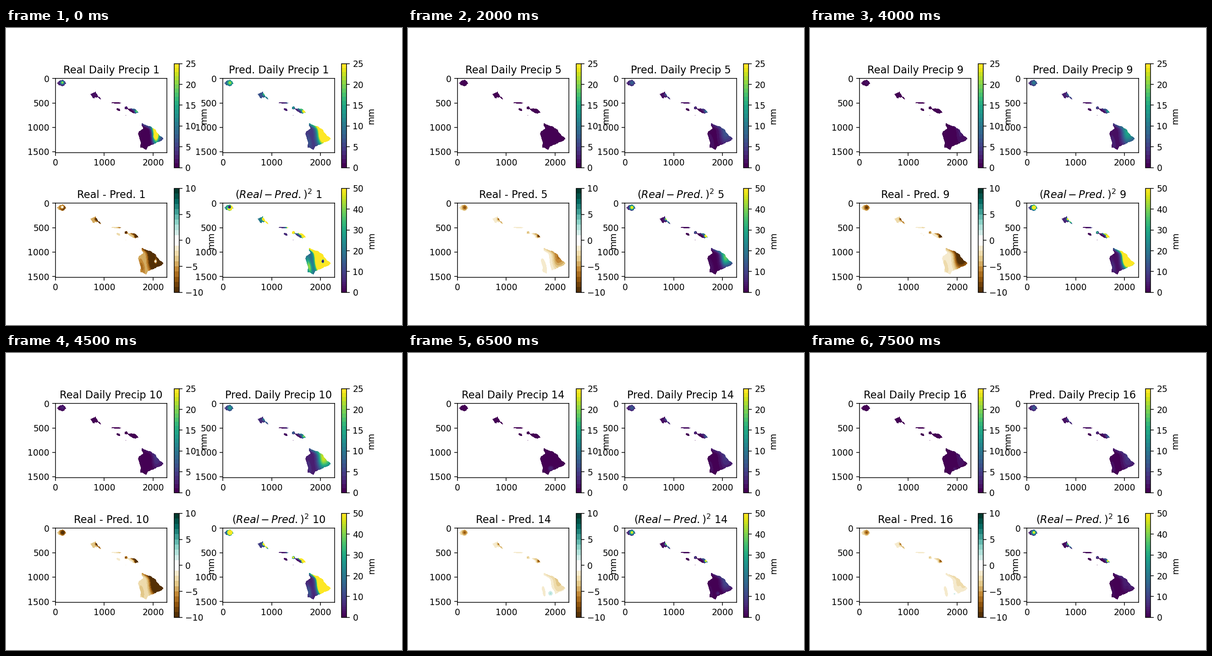
Recreate the animation shown at these times as a matplotlib script. Size 864x648 px, loop 8000 ms.

```python
import matplotlib.pyplot as plt
import numpy as np
from matplotlib.animation import FuncAnimation
from matplotlib.colors import ListedColormap
from matplotlib.path import Path

W, H, CELL = 2288, 1520, 4
PX = 0.10642  # screen pixels per data unit; outlines and fields use pixels
gx, gy = np.meshgrid((np.arange(0, W, CELL) + CELL / 2) * PX,
                     (np.arange(0, H, CELL) + CELL / 2) * PX)
rng = np.random.default_rng(4)


def turned(x, y, deg):
    c, s = np.cos(np.radians(deg)), np.sin(np.radians(deg))
    return (gx - x) * c + (gy - y) * s, (gy - y) * c - (gx - x) * s


def oval(x, y, a, b, deg=0, wobble=0.06):
    """Mask of an ellipse with a slightly lobed edge."""
    u, v = turned(x, y, deg)
    t = np.arctan2(v / b, u / a)
    edge = 1 + wobble * (np.cos(5 * t) + 0.6 * np.sin(8 * t))
    return np.hypot(u / a, v / b) < edge


def coast(*xy):
    """Mask of a polygon whose sides are roughened by midpoint shifts."""
    p = np.array(xy, float).reshape(-1, 2)
    for _ in range(2):
        side = np.roll(p, -1, axis=0) - p
        normal = np.column_stack([-side[:, 1], side[:, 0]])
        mid = p + side / 2 + normal * rng.normal(0, 0.05, (len(p), 1))
        p = np.stack([p, mid], axis=1).reshape(-1, 2)
    inside = Path(p).contains_points(np.column_stack([gx.ravel(), gy.ravel()]))
    return inside.reshape(gx.shape)


def bump(x, y, a, b=None, deg=0):
    """Gaussian hill with radii a and b, turned by deg."""
    u, v = turned(x, y, deg)
    return np.exp(-((u / a) ** 2 + (v / (b or a)) ** 2) / 2)


def ridge(left, right, height):
    """North-south ridge on the big island with uneven flanks."""
    x0 = 219 - 0.012 * np.clip(124 - gy, 0, None) ** 2
    w = np.where(gx < x0, left, right)
    return np.exp(-(((gx - x0) / w) ** 2 + ((gy - 119) / height) ** 2) / 2)


KAU = oval(14, 10, 9.3, 7.4) | oval(5.5, 10.3, 3.4, 2.3)
OAH = coast(74.5, 34.3, 82, 30.7, 87.5, 27, 92, 34.5, 94, 39, 97.5, 40.5, 101.3, 46.6,
            96, 46, 92, 42, 86.5, 42.3, 85, 44.4, 79.5, 43.8, 78.3, 39.5)
MOL = oval(133, 53.4, 12.6, 2.4, 2)
LAN = oval(137, 68, 5.4, 3.5, 30)
KAH = oval(151.7, 80.9, 3.6, 1.4, -28)
MAU = (oval(153.7, 64.3, 4.7, 4.2) | oval(159, 67.4, 4.5, 1.9, 15)
       | oval(170, 70.8, 11.2, 5.6, 18))
BIG = coast(187, 95.7, 196, 100, 208, 103.7, 219, 110.7, 221, 116.7, 229, 124.7,
            236.3, 130.7, 233, 135.2, 219, 142.2, 206, 147.7, 201, 150.7, 198, 157.2,
            190, 152.7, 184, 151, 185, 139.7, 179, 121, 181, 114.7, 190, 108.7, 186, 99.7)
LAND = KAU | OAH | MOL | LAN | KAH | MAU | BIG

# Unit patterns that each day scales
kau_wide, kau_tight = bump(15.5, 9.5, 4) * KAU, bump(15, 9, 2.6) * KAU
kau_body = KAU / (1 + np.exp(5 - gx))
oah_peak = np.maximum(bump(89.7, 34.7, 2.2), 0.6 * bump(93.5, 39.5, 5, 1.6, 50)) * OAH
mau_east = np.maximum(bump(176.7, 71.5, 3.2), 0.45 * bump(171, 67.5, 7, 2.2, 28)) * MAU
mau_west = bump(153.3, 64, 2.4) * MAU
mol_east = bump(144, 52, 5) * MOL
big_wide, big_tight = ridge(8, 16, 17) * BIG, ridge(4.5, 4, 14) * BIG
big_coast = ridge(6, 15, 17) * BIG
north = bump(196, 101.5, 11, 3, 24) * BIG
south_west = bump(188, 138, 4, 13, -12) * BIG

# How rainy each predicted day is
WETNESS = [1, 0.25, 0, 0.04, 0.06, 0.05, 0.06, 0.1, 0.25, 0.46, 0.65, 0.9, 0.3, 0, 0.02, 0]
STORMS = {
    1: dict(peak=20, body=3, oahu=1.5, maui=20, top=26, shore=11, spot=(217, 127, 2.5, 11)),
    3: dict(spot=(199, 150, 4.6, 7.5)),
    12: dict(body=32, oahu=8, maui=12, top=15, shore=12, spot=(218, 113, 3, 7)),
    14: dict(shore=0.9, spot=(203, 142, 4.5, 3)),
    16: dict(top=0.7, shore=1.4, spot=(207, 143, 2.8, 2.2)),
}


def predicted(wet):
    def mix(dry, full):
        return dry + (full - dry) * wet
    return (mix(1.8, 6) * KAU + mix(5.6, 16) * kau_wide
            + mix(1.4, 6) * OAH + mix(5.6, 13) * oah_peak
            + mix(1.1, 2.6) * MOL + mix(0.6, 6) * mol_east
            + mix(0.5, 2.5) * (LAN | KAH)
            + mix(0.5, 3) * MAU + mix(7.5, 34) * mau_east + mix(3, 12) * mau_west
            + mix(0.4, 4) * BIG + mix(3.8, 41) * big_wide
            + mix(2.2, 9) * north + mix(0.9, 2.5) * south_west)


def observed(peak=0, body=0, oahu=0, maui=0, top=0, shore=0, spot=None):
    rain = (peak * kau_tight + body * kau_body + oahu * OAH
            + maui * (mau_east + 0.15 * mau_west)
            + top * big_tight + shore * (big_coast + 0.5 * north))
    if spot:
        *place, amount = spot
        rain = rain + amount * bump(*place) * BIG
    return rain


def maps(day):
    wet = WETNESS[day - 1]
    light = dict(peak=5 * wet, body=2 * wet, oahu=wet, maui=2 * wet, top=wet, shore=8 * wet)
    real, pred = observed(**STORMS.get(day, light)), predicted(wet)
    diff = real - pred
    return [np.ma.masked_where(~LAND, f) for f in (real, pred, diff, diff ** 2)]


brown_teal = plt.get_cmap("BrBG", 20)(np.arange(20))
brown_teal[9:11] = 1
viridis = plt.get_cmap("viridis", 25)
PANELS = [
    ("Real Daily Precip", viridis, 0, 25, 5),
    ("Pred. Daily Precip", viridis, 0, 25, 5),
    ("Real - Pred.", ListedColormap(brown_teal), -10, 10, 5),
    ("$(Real-Pred.)^2$", plt.get_cmap("viridis", 50), 0, 50, 10),
]

fig, axes = plt.subplots(2, 2, figsize=(6.4, 4.8), dpi=135)
images = []
for ax, field, (_, cmap, lo, hi, step) in zip(axes.flat, maps(1), PANELS):
    im = ax.imshow(field, cmap=cmap, vmin=lo, vmax=hi,
                   extent=(-0.5, W - 0.5, H - 0.5, -0.5))
    ax.set_xticks(range(0, W, 1000))
    ax.set_yticks(range(0, H, 500))
    fig.colorbar(im, ax=ax, label="mm", ticks=range(lo, hi + 1, step))
    images.append(im)


def update(i):
    for ax, im, field, panel in zip(axes.flat, images, maps(i + 1), PANELS):
        im.set_data(field)
        ax.set_title(f"{panel[0]} {i + 1}")
    return images


anim = FuncAnimation(fig, update, frames=len(WETNESS), interval=500, repeat=True)
plt.show()
```
